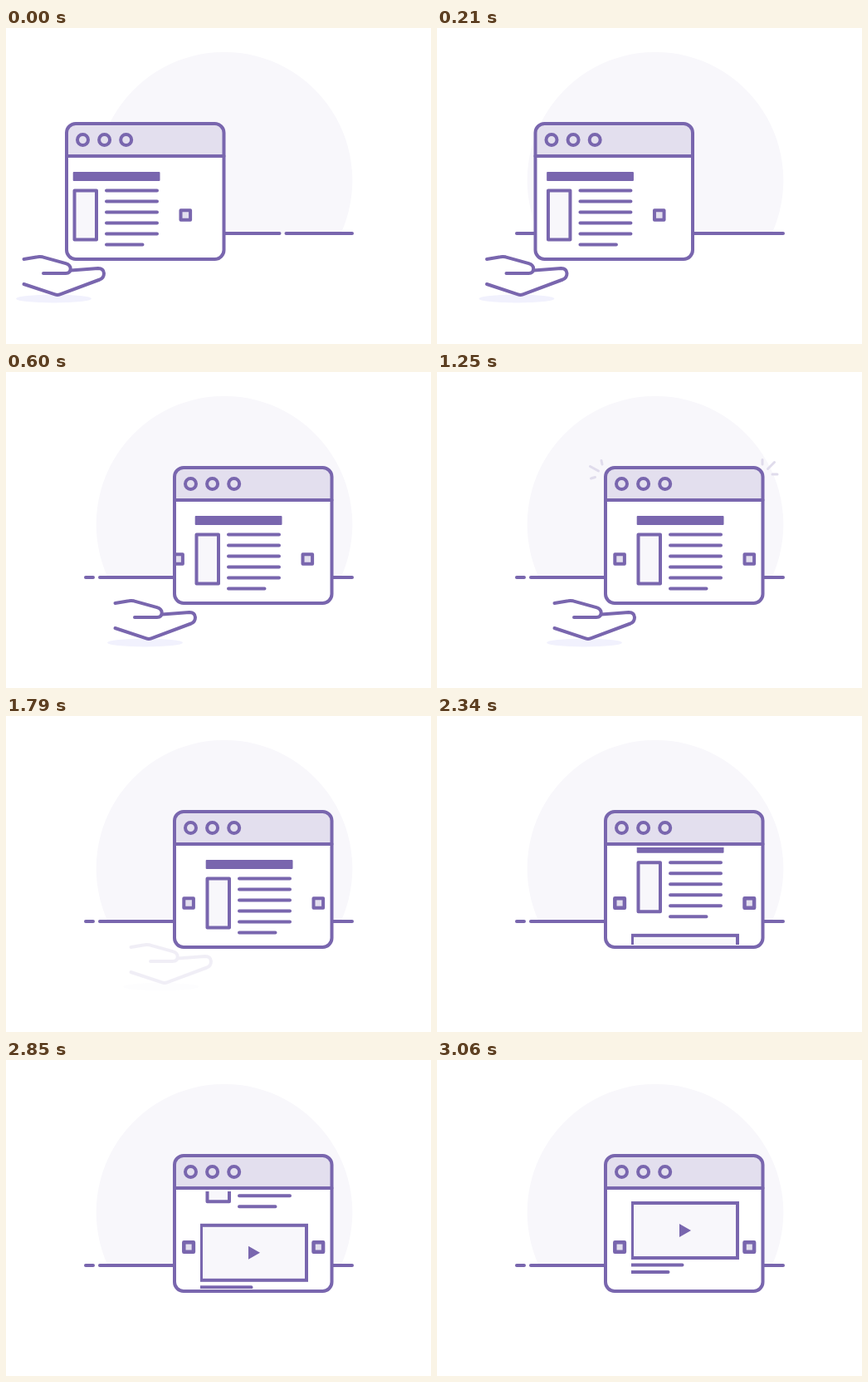
Animation of 512 by 380 pixels, one loop 4730 ms. Source, as an HTML page:

```html
<!DOCTYPE html>
<html lang="en">
<head>
<meta charset="utf-8">
<title>Page slider</title>
<style>
html, body { margin: 0; width: 100%; height: 100%; overflow: hidden; background: #fff; }
svg { display: block; width: 100vw; height: 100vh; }
.ink { fill: none; stroke: #7966ae; stroke-width: 4; stroke-linecap: round; stroke-linejoin: round; }
.pale { fill: #f8f7fb; }
.tint { fill: #e3dfee; }
.solid { fill: #7966ae; stroke: none; }
</style>
</head>
<body>
<svg viewBox="0 0 512 380" preserveAspectRatio="none">
  <defs>
    <clipPath id="view"><rect x="203" y="158" width="189" height="117"/></clipPath>
    <clipPath id="column"><rect x="234" y="100" width="140" height="400"/></clipPath>
  </defs>

  <path class="pale" d="M122.5 247A154.3 154.3 0 1 1 403.5 247Z"/>
  <path id="ground" class="ink"/>

  <g id="sparks" fill="none" stroke="#e0dcec" stroke-width="3" stroke-linecap="round">
    <path d="M184.5 113.5L194.5 119M198 106.5L199 111M185.5 128L190.5 126.5"/>
    <path d="M392 105.5V111M398.5 116.5L406.5 108.5M404 123H410"/>
  </g>

  <g id="hand">
    <ellipse cx="57.5" cy="325.5" rx="45.5" ry="5" fill="#f1f1fd"/>
    <path class="ink" d="M21.5 278L38 275.2Q41 274.6 44 275.3L72 283.2Q77.7 285 77.7 289.5Q77.5 295 72 295H45"/>
    <path class="ink" d="M78 291.5L111 289Q117.5 289 118 295Q118 300.5 113 302.5L65 320.3Q62 321.5 59 320.3L21.5 308"/>
  </g>

  <g id="browser">
    <rect x="203" y="115" width="189.5" height="163" rx="11" fill="#fff"/>
    <path class="tint" d="M203 154V126Q203 115 214 115H381.5Q392.5 115 392.5 126V154Z"/>
    <g clip-path="url(#view)">
      <g id="slide" class="ink">
        <g id="page">
          <rect class="solid" x="240.7" y="173" width="104.8" height="11" rx="1"/>
          <rect class="pale" x="242.5" y="195.5" width="26.5" height="59"/>
          <path id="lines"/>
          <g clip-path="url(#column)">
            <rect class="pale" x="235" y="283" width="127" height="66" stroke-linejoin="miter"/>
            <path class="solid" d="M292 308L306 316L292 324Z"/>
            <path d="M230 357.5H295.5M230 366H278.5"/>
          </g>
        </g>
        <g id="arrows">
          <rect class="tint" x="214.3" y="219.2" width="11.6" height="11.6"/>
          <rect class="tint" x="370.5" y="219.2" width="11.6" height="11.6"/>
        </g>
      </g>
    </g>
    <g class="ink">
      <rect x="203" y="115" width="189.5" height="163" rx="11"/>
      <path d="M203 154H392.5"/>
      <circle cx="222.5" cy="134.5" r="6.5"/>
      <circle cx="248.6" cy="134.5" r="6.5"/>
      <circle cx="274.7" cy="134.5" r="6.5"/>
    </g>
  </g>
</svg>
<script>
const LOOP = 4730, STEP = 30;
const el = id => document.getElementById(id);
const [ground, sparks, hand, browser, slide, page, arrows] =
  ['ground', 'sparks', 'hand', 'browser', 'slide', 'page', 'arrows'].map(el);

el('lines').setAttribute('d', Array.from({ length: 6 },
  (_, i) => `M281 ${195.5 + 13 * i}H${i < 5 ? 342 : 324.5}`).join(''));

const move = (node, x, y = 0) => node.setAttribute('transform', `translate(${x} ${y})`);

// Progress of a stepped linear tween; `last` is where its final step holds.
function tween(t, start, length, last = length) {
  const passed = Math.floor((t - start) / STEP + 1e-6) * STEP;
  return Math.max(0, Math.min(passed, last)) / length;
}

function draw(t) {
  const enter = tween(t, 0, 600);
  const settle = t < 1250 ? tween(t, 600, 500, 450) : 1;
  const leave = tween(t, 1250, 600, 540);
  const scroll = tween(t, 2190, 870);

  const gap = 333.5 - 224.5 * tween(t, 0, 300);
  ground.setAttribute('d', `M96 247H${gap - 4}M${gap + 4} 247H417`);

  move(browser, 130 * (enter - 1));
  move(slide, -30 + 17 * enter + 13 * settle);
  move(page, 0, -111 * scroll);
  arrows.setAttribute('stroke-width', 4);
  arrows.style.strokeWidth = t < 2190 ? 4 : 4.5;

  move(hand, 110 * enter + 10 * settle + 10 * leave);
  hand.setAttribute('opacity', t < 2190 ? 1 - leave : 0);

  move(sparks, 0, -6 * leave);
  sparks.setAttribute('opacity', t < 1250 ? 0 : Math.max(0, 1 - leave / 0.9));
}

const begin = performance.now();
function tick() {
  draw((performance.now() - begin) % LOOP);
  requestAnimationFrame(tick);
}
tick();
</script>
</body>
</html>
```
